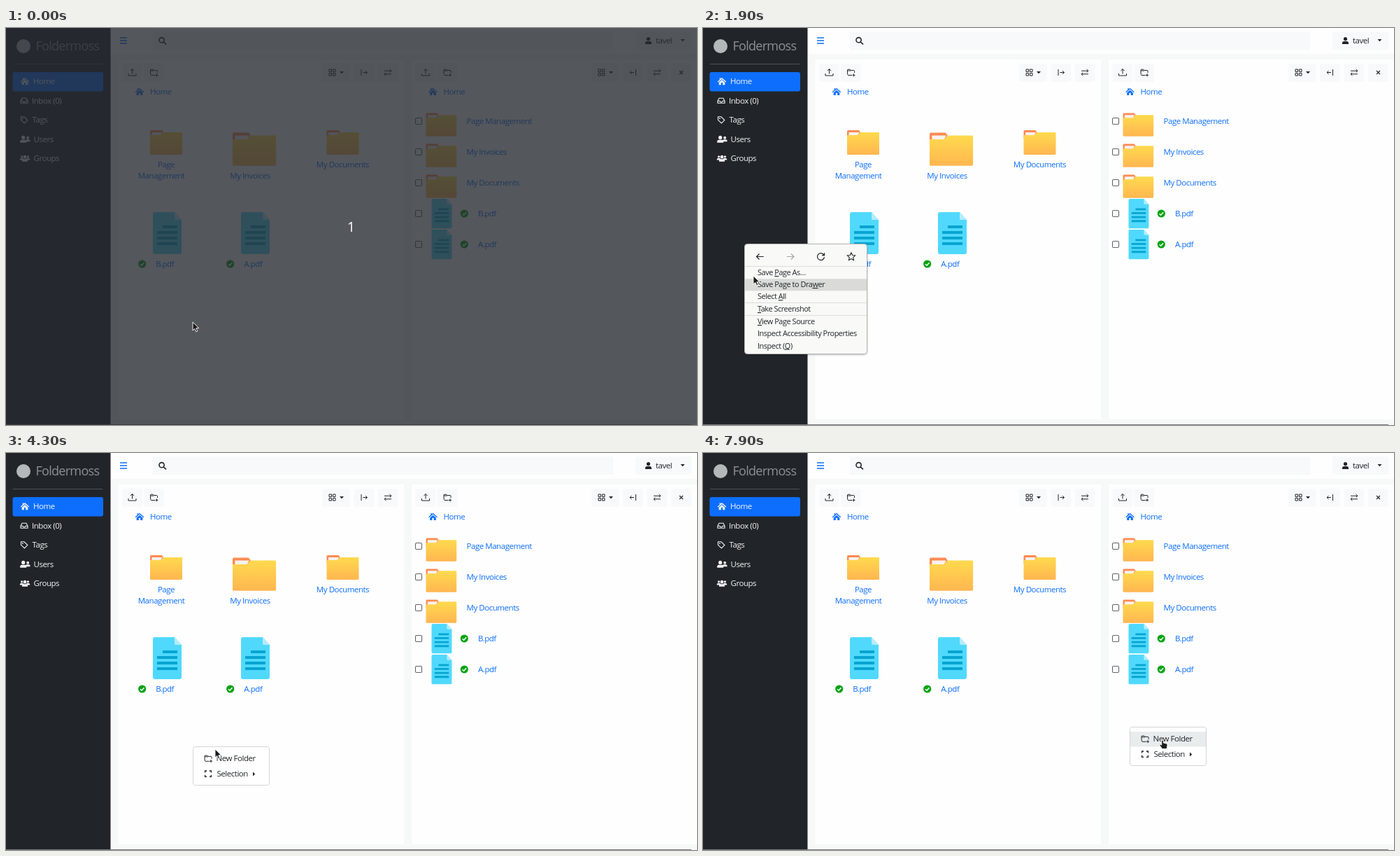
Recreate the animation shown at these times as an HTML page. Size 988 by 567 pixels, loop 8000 ms.

```html
<!DOCTYPE html>
<html lang="en">
<head>
<meta charset="utf-8">
<title>File manager context menus</title>
<style>
html, body { margin: 0; width: 100%; height: 100%; overflow: hidden; background: #fff; }
svg { display: block; width: 100vw; height: 100vh; }
text { font: 11.5px "Open Sans", "Noto Sans", sans-serif; letter-spacing: -.04em; fill: currentColor; white-space: pre; }
.line { fill: none; stroke: currentColor; }
.side { color: #f4f5f6; }
.link { color: #0d6efd; }
.dark { color: #212529; }
.mid { text-anchor: middle; }
.native text { font-size: 10.9px; }
.brand { font-size: 18px; color: #8b9197; }
.count { font-size: 20px; font-weight: 500; color: #fff; }
u, .key { text-decoration: underline; }
</style>
</head>
<body>
<svg id="stage" viewBox="0 0 988 567" xmlns="http://www.w3.org/2000/svg">
<defs>
  <linearGradient id="gold" x2="0" y2="1"><stop stop-color="#ffda4e"/><stop offset="1" stop-color="#ffb650"/></linearGradient>
  <filter id="shadow" x="-10%" y="-10%" width="120%" height="120%"><feDropShadow dx="0" dy="1" stdDeviation="1.2" flood-opacity=".25"/></filter>

  <g id="folder">
    <path d="M1.5 0H17L19 3V12H0V1.5Q0 0 1.5 0Z" fill="#ff8a52"/>
    <path d="M2.5 3H17.5L15 8H2.5Z" fill="#f7f2ee"/>
    <path d="M0 7H14.5Q16 7 17 5.2T20 3H45Q46 3 46 4V33.5Q46 35 44.5 35H1.5Q0 35 0 33.5Z" fill="url(#gold)"/>
  </g>
  <g id="doc">
    <path d="M3 0H31L41 11V57Q41 60 38 60H3Q0 60 0 57V3Q0 0 3 0Z" fill="#50d9fd"/>
    <path d="M31 0L41 11H33Q31 11 31 9Z" fill="#b4ecfb"/>
    <path d="M14 19H35V23H14ZM6 27H35V31H6ZM6 35H35V39H6ZM6 43H35V47H6Z" fill="#07a5d0"/>
  </g>
  <g id="ok"><circle r="5.6" fill="#07a313"/><path d="M-2.7 .2L-.7 2.2L2.8-1.8" class="line" stroke="#fff" stroke-width="1.5" style="stroke:#fff"/></g>
  <rect id="box" x="-4.5" y="-4.5" width="9" height="9" rx="1.5" fill="#fff" stroke="#626468" stroke-width="1.1"/>

  <path id="home" d="M0-5.2L6.3 .3L5.4 1.3L0-3.4L-5.4 1.3L-6.3 .3L-3.2-2.4V-5H-1.8V-3.6ZM0-2.2L4.3 1.5V5H1.2V1.8H-1.2V5H-4.3V1.5Z" fill="currentColor"/>
  <path id="inbox" class="line" d="M-5 .5L-3-3.5H3L5 .5V3.5H-5ZM-5 .5H-2L-1 2H1L2 .5H5" stroke-width="1.1"/>
  <g id="tag"><path class="line" d="M-4.5-4.5H0L4.8 .3L.4 4.7L-4.5 0Z" stroke-width="1.1"/><circle cx="-2.1" cy="-2.1" r=".9" fill="currentColor"/></g>
  <path id="person" d="M0-5A2.6 2.6 0 0 1 0 .2A2.6 2.6 0 0 1 0-5ZM-4.5 5V3.5Q-4.5 1-2 1H2Q4.5 1 4.5 3.5V5Z" fill="currentColor"/>
  <g id="users"><use href="#person" x="-2.3"/><use href="#person" transform="translate(4.2 -.2) scale(.75)"/></g>
  <g id="groups"><use href="#person" transform="translate(-4.4 -1) scale(.62)"/><use href="#person" transform="translate(4.4 -1) scale(.62)"/><use href="#person" transform="scale(.9)"/></g>

  <path id="bars" class="line" d="M-5-4H5M-5 0H5M-5 4H5" stroke-width="1.3"/>
  <path id="search" class="line" d="M2.2-.8A3.6 3.6 0 1 0-5-.8A3.6 3.6 0 1 0 2.2-.8M1.2 1.8L5 5.4" stroke-width="1.6"/>
  <path id="upload" class="line" d="M-5.5 1.5V4.5H5.5V1.5M0 2V-5M-2.6-2.4L0-5L2.6-2.4" stroke-width="1"/>
  <path id="newdir" class="line" d="M1.5 4H-4Q-5 4-5-.5V-3.5Q-5-4.3-4-4.3H-1.3L0-3H4Q5-3 5-2V.5M-5-2.5H0M4 1.8V5.8M2 3.8H6" stroke-width="1"/>
  <path id="grid" class="line" d="M-4.5-4.5H-1V-1H-4.5ZM1-4.5H4.5V-1H1ZM-4.5 1H-1V4.5H-4.5ZM1 1H4.5V4.5H1Z" stroke-width="1"/>
  <path id="caret" d="M-3-1.4H3L0 1.7Z" fill="currentColor"/>
  <path id="barright" class="line" d="M-4-4.5V4.5M-1.5 0H4.5M2-2.4L4.5 0L2 2.4" stroke-width="1"/>
  <path id="swap" class="line" d="M-5 2.3H5M-2.6 0L-5 2.3L-2.6 4.6M5-2.3H-5M2.6-4.6L5-2.3L2.6 0" stroke-width="1"/>
  <path id="cross" class="line" d="M-2.5-2.5L2.5 2.5M2.5-2.5L-2.5 2.5" stroke-width="1.1"/>
  <path id="corners" class="line" d="M-4.4-1.6V-4.2H-1.8M1.8-4.2H4.4V-1.6M4.4 1.6V4.2H1.8M-1.8 4.2H-4.4V1.6" stroke-width="1.4"/>
  <path id="back" class="line" d="M5.2 0H-5M-1-4L-5 0L-1 4" stroke-width="1.2"/>
  <path id="reload" class="line" d="M4.4-2.4A5 5 0 1 0 5 .6M5-5.2V-1.8H1.6" stroke-width="1.2"/>
  <path id="star" class="line" d="M0-5.6L1.7-1.9L5.6-1.5L2.7 1.2L3.5 5.1L0 3.1L-3.5 5.1L-2.7 1.2L-5.6-1.5L-1.7-1.9Z" stroke-width="1.1"/>
</defs>
<g id="page"></g>
<g id="native" class="native dark"></g>
<g id="menu" class="dark"></g>
<g id="dim">
  <rect width="988" height="567" fill="rgb(39,42,49)" fill-opacity=".79"/>
  <text class="count mid" x="493" y="291">1</text>
</g>
<g id="cursor" fill="#1b1b1b" stroke="#fff" stroke-width=".9" stroke-linejoin="round">
  <path id="arrow" d="M0 0V12L2.8 9.5L4.8 13.8L6.8 12.9L4.9 8.7H8.8Z"/>
  <path id="hand" d="M-1.3 .6Q0-.8 1.3 .6V4L5.6 5Q7.3 5.5 7 7.5L6 12.5H-.4L-4 7.6Q-4 6-2.4 6.4L-1.3 7.2Z"/>
</g>
</svg>
<script>
const $ = id => document.getElementById(id);
const text = (x, y, s, cls = '') => `<text x="${x}" y="${y}" class="${cls}">${s}</text>`;
const icon = (id, x, y, cls = 'dark') => `<use href="#${id}" x="${x}" y="${y}" class="${cls}"/>`;
const sized = (id, x, y, k) => `<use href="#${id}" transform="translate(${x} ${y}) scale(${k})"/>`;
const rect = (x, y, w, h, fill, extra = '') => `<rect x="${x}" y="${y}" width="${w}" height="${h}" fill="${fill}" ${extra}/>`;
const key = c => `<tspan class="key">${c}</tspan>`;
const pale = '#f8f9fa', panel = '#fefefe';

function sidebar() {
  const items = [['home', 27, 39, 'Home'], ['inbox', 26, 37, 'Inbox (0)'], ['tag', 26, 37.5, 'Tags'],
    ['users', 27, 39.5, 'Users'], ['groups', 27, 39.5, 'Groups']];
  return rect(0, 0, 149.5, 567, '#212529')
    + '<circle cx="25" cy="26" r="10" fill="#b3b8bb"/>'
    + text(42.5, 31.5, 'Foldermoss', 'brand')
    + rect(10, 51, 128, 1, '#505459')
    + rect(9.5, 63, 129.5, 27.5, '#0d6efd', 'rx="3"')
    + items.map(([id, ix, tx, s], i) => icon(id, ix, 76.3 + 27.5 * i, 'side') + text(tx, 80.2 + 27.5 * i, s, 'side')).join('');
}

function topbar() {
  return rect(149.5, 0, 839, 37, panel)
    + icon('bars', 168, 18, 'link')
    + rect(210, 5, 658, 26, pale) + icon('search', 224, 18)
    + rect(900, 5, 80, 26, pale, 'rx="2"') + icon('person', 918.5, 18)
    + text(929, 22, 'tavel', 'dark') + icon('caret', 967.5, 17.5);
}

function toolbar(buttons) {
  return buttons.map(([id, x, w = 28.5]) => rect(x - 14.3, 51, w, 26, pale, 'rx="2"')
    + (id == 'barleft' ? `<use href="#barright" class="dark" transform="translate(${x} 63.5) scale(-1 1)"/>` : icon(id, x, 63.5))
    + (id == 'grid' ? icon('caret', x + 13.5, 63.5) : '')).join('');
}

function leftPanel() {
  return rect(160.5, 45, 408.5, 514, panel)
    + toolbar([['upload', 180.5], ['newdir', 211.5], ['grid', 466.5, 39.5], ['barright', 512], ['swap', 546]])
    + icon('home', 191, 91, 'link') + text(206, 95.3, 'Home', 'link')
    + sized('folder', 206, 146, 1) + sized('folder', 324, 149.5, 1.35) + sized('folder', 458.5, 146, 1)
    + text(229, 198.5, 'Page', 'link mid') + text(222, 215, 'Management', 'link mid')
    + text(349, 215, 'My Invoices', 'link mid') + text(481.5, 198.5, 'My Documents', 'link mid')
    + [['B', 210], ['A', 336]].map(([s, x]) => sized('doc', x, 263, 1)
      + icon('ok', x - 15.3, 337) + text(x + 4.3, 341, s + '.pdf', 'link')).join('');
}

function rightPanel() {
  const names = ['Page Management', 'My Invoices', 'My Documents', 'B.pdf', 'A.pdf'];
  return rect(580, 45, 408, 514, panel)
    + toolbar([['upload', 600], ['newdir', 631], ['grid', 851.5, 39.5], ['barleft', 896.5], ['swap', 931], ['cross', 965.5]])
    + icon('home', 610.5, 91, 'link') + text(625.5, 95.3, 'Home', 'link')
    + names.map((s, i) => {
      const y = 133 + 44 * i;
      return icon('box', 590, y) + (i < 3
        ? sized('folder', 600.5, y - 11.5, .95) + text(658.5, y + 4.2, s, 'link')
        : sized('doc', 608.5, y - 21, .705) + icon('ok', 655.3, y) + text(675, y + 4.2, s, 'link'));
    }).join('');
}

$('page').innerHTML = rect(0, 0, 988, 567, '#f7f8f8') + topbar() + leftPanel() + rightPanel() + sidebar()
  + rect(0, 566, 980, 1, '#77797b');

// Browser menu: rows are [top, baseline, label]
const rows = [
  [341, 353, `Save ${key('P')}age As…`], [358.3, 370, `Save Page to Dra${key('w')}er`],
  [375, 387.3, `Select ${key('A')}ll`], [393, 405, `${key('T')}ake Screenshot`],
  [411, 423, `${key('V')}iew Page Source`], [428, 440, 'Inspect Accessibility Properties'],
  [445, 457.5, `Inspect (${key('Q')})`]];
$('native').innerHTML = rect(59.5, 308.5, 175, 157, '#f9f9f8', 'rx="4" stroke="#b4b4b3" filter="url(#shadow)"')
  + rect(60, 312, 43, 28, '#dadad9', 'id="mark"')
  + [340, 392, 410].map(y => rect(60, y, 174, 1, '#dededd')).join('')
  + icon('back', 81.5, 326.5) + '<use href="#back" transform="translate(125 326.5) scale(-1 1)" color="#a5a5a4"/>'
  + icon('reload', 168.5, 326.5) + icon('star', 212, 326.5)
  + rows.map(([, y, s]) => text(78, y, s)).join('');

// Page menu, drawn at its own top left corner
$('menu').innerHTML = rect(.5, .5, 109, 55, '#fff', 'rx="3" stroke="#d3d5d7"')
  + rect(1, 7, 108, 21.5, '#e9ecec', 'id="hover"')
  + icon('newdir', 22, 17.3) + text(33.5, 21.2, 'New Folder')
  + icon('corners', 22, 39.2) + text(34.5, 43.2, 'Selection')
  + '<path d="M86 36.6L89.2 39.6L86 42.6Z" fill="currentColor"/>';

// Pointer path: time, x, y
const path = [
  [200, 267, 420], [700, 58, 308], [900, 58, 308], [1000, 62, 325], [1100, 67, 352], [1400, 74, 392],
  [1600, 74, 392], [1800, 70, 366], [2100, 76, 330], [2300, 76, 330], [2500, 77, 370], [2600, 77, 379],
  [2700, 78, 386], [3300, 267, 420], [3800, 267, 420], [4300, 299, 423], [4700, 312, 436], [4800, 312, 436],
  [5400, 397, 440], [5700, 444, 403], [5800, 471, 403], [6000, 471, 403], [6400, 610, 392], [6600, 610, 392],
  [7000, 634, 410], [7100, 700, 411], [7200, 745, 445], [7400, 820, 528], [7500, 820, 528], [7600, 760, 450],
  [7700, 700, 413], [7900, 657, 410]];

function pointer(t) {
  const i = path.findIndex(p => p[0] >= t);
  if (i <= 0) return path[i ? path.length - 1 : 0].slice(1);
  const [t0, x0, y0] = path[i - 1], [t1, x1, y1] = path[i], k = (t - t0) / (t1 - t0);
  return [x0 + (x1 - x0) * k, y0 + (y1 - y0) * k];
}

const show = (id, on) => $(id).setAttribute('display', on ? 'inline' : 'none');

function markRow(x, y) {
  const set = (top, w, h) => Object.entries({ y: top, width: w, height: h }).forEach(([k, v]) => $('mark').setAttribute(k, v));
  const row = rows.findLast(r => y >= r[0]);
  if (row) set(row[0], 174, 17);
  else set(312, 43, 28);
  show('mark', x >= 60 && x < 234 && y >= 312 && y < 462);
}

function draw(now) {
  const t = Math.floor(now % 8000 / 100) * 100;
  const [x, y] = pointer(t), [hx, hy] = pointer(t - 100); // highlights trail the pointer
  const native = t >= 800 && t < 3000, second = t >= 6500, menu = t >= 3500;
  const mx = second ? 610 : 267, my = second ? 391 : 419;
  const over = menu && hx > mx && hx < mx + 110 && hy >= my + 7 && hy < my + 28.5;

  show('dim', t < 100);
  show('native', native);
  if (native) markRow(hx, hy);
  show('menu', menu);
  $('menu').setAttribute('transform', `translate(${mx} ${my})`);
  show('hover', over);
  show('arrow', !over);
  show('hand', over);
  $('cursor').setAttribute('transform', `translate(${x} ${y})`);
}

const start = performance.now();
function tick() {
  draw(performance.now() - start);
  requestAnimationFrame(tick);
}
tick();
</script>
</body>
</html>
```
